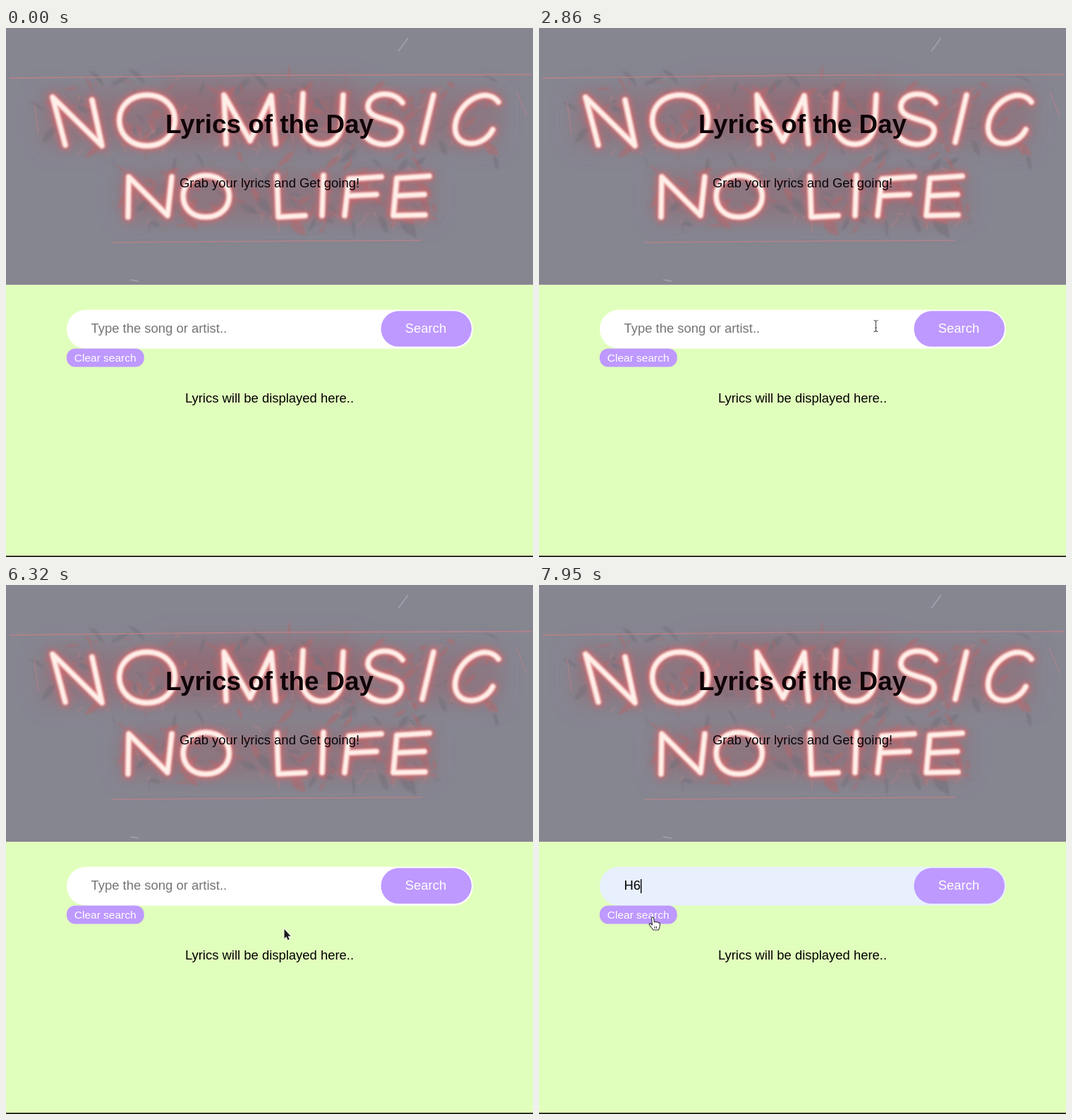
Recreate the animation shown at these times as an HTML page. Size 747 px wide and 750 px high, loop 8000 ms.

```html
<!DOCTYPE html>
<html lang="en">
<head>
<meta charset="utf-8">
<title>Lyrics of the Day</title>
<style>
html, body { margin: 0; width: 100%; height: 100%; overflow: hidden; background: #e1ffbc; }
svg { display: block; width: 747px; height: 750px; font: 18.45px "Liberation Sans", Arial, sans-serif; }
.tube { fill: none; stroke-linecap: round; stroke-linejoin: round; }
.mid { text-anchor: middle; }
</style>
</head>
<body>
<svg viewBox="0 0 747 750">
  <defs>
    <filter id="soft" x="-20%" y="-40%" width="140%" height="180%"><feGaussianBlur stdDeviation="16"/></filter>
    <filter id="glow" x="-10%" y="-10%" width="120%" height="120%"><feGaussianBlur stdDeviation="4"/></filter>
    <filter id="edge"><feGaussianBlur stdDeviation=".9"/></filter>
    <clipPath id="photo"><rect width="747" height="364"/></clipPath>
    <path id="sign" d="M84 166L66 98L136 167L122 102
      M200 95C254 96 251 167 200 167C149 167 146 96 200 95
      M312 164L309 95L346 160L376 96L382 164
      M421 93L419 134C420 175 475 175 476 134L478 95
      M562 106C548 86 513 92 513 112C514 134 564 126 560 148C556 169 524 170 510 154
      M606 95L590 162
      M698 105C681 82 642 104 637 136C632 171 676 172 690 144
      M173 268L174 211L229 266L235 211
      M283 209C328 210 327 268 283 268C241 268 240 210 283 209
      M384 210L386 268L424 266 M450 209L448 266
      M480 266L486 214L532 211M484 238L525 236
      M600 210L554 213L549 266L594 265M552 238L593 236"/>
  </defs>

  <g clip-path="url(#photo)">
    <rect width="747" height="364" fill="#868691"/>
    <g filter="url(#soft)" fill="#94626b">
      <rect x="50" y="90" width="650" height="78" opacity=".42"/>
      <rect x="220" y="75" width="280" height="85" opacity=".45"/>
      <rect x="165" y="206" width="440" height="66" opacity=".45"/>
    </g>
    <g filter="url(#edge)">
      <path id="shards" fill="#75707b" opacity=".6"/>
      <path id="leaves" fill="#b4666b" opacity=".5"/>
      <path id="glints" fill="none" stroke="#d08785" stroke-width="1.3" opacity=".55"/>
    </g>
    <g fill="none" stroke="#c48286" stroke-width="1.6">
      <path d="M5 71L380 67L745 66" opacity=".85"/>
      <path d="M150 304L590 301" opacity=".75"/>
      <path d="M40 105L46 150M724 90L738 125M386 270L387 290" opacity=".5"/>
      <path d="M556 33L570 14M176 357L188 359" stroke="#a2a2ad"/>
    </g>
    <use href="#sign" class="tube" stroke="#d3686d" stroke-width="15" opacity=".75" filter="url(#glow)"/>
    <use href="#sign" class="tube" stroke="#eba19f" stroke-width="10" opacity=".8" filter="url(#edge)"/>
    <use href="#sign" class="tube" stroke="#ffefe9" stroke-width="6.5" filter="url(#edge)"/>
  </g>

  <text class="mid" x="373.5" y="148.5" font-size="36.8" font-weight="bold" fill="#100308">Lyrics of the Day</text>
  <text class="mid" x="373.5" y="226.3" fill="#08040a">Grab your lyrics and Get going!</text>

  <rect id="field" x="86" y="399.5" width="576" height="55" rx="27.5"/>
  <text id="entry" x="120.5" y="432.3"></text>
  <rect id="caret" y="417" width="1.4" height="20"/>
  <g fill="#be99ff">
    <rect x="531.5" y="401.3" width="128.5" height="50.5" rx="25.2"/>
    <rect x="86" y="454.5" width="109.7" height="26" rx="12"/>
  </g>
  <g class="mid" fill="#fff">
    <text x="595" y="432.3">Search</text>
    <text x="140.7" y="473" font-size="15.5">Clear search</text>
  </g>
  <text class="mid" x="373.5" y="531">Lyrics will be displayed here..</text>
  <rect y="748.3" width="747" height="2" fill="#111"/>

  <g id="pointer" stroke-linejoin="round">
    <path id="arrow" d="M.5 1V14L3.5 11.4L5.6 16.3L7.6 15.4L5.6 10.7H9.4Z" fill="#1a1a1a" stroke="#eee" stroke-width="2" paint-order="stroke"/>
    <path id="beam" d="M-3-8Q0-8 0-6Q0-8 3-8M0-6V6M-3 8Q0 8 0 6Q0 8 3 8M-1.5 2.5H1.5" fill="none" stroke="#555" stroke-width="1.2"/>
    <path id="hand" d="M-1.5 1Q0-1 1.5 1L2.5 7Q4 5.5 5 7Q7 6 8 8Q10.5 7 10.5 10Q10.5 14 8.5 18H1L-4.5 11Q-5.5 8.5-3 9L-.5 11ZM3 13V16M5.5 13V16" fill="#fff" stroke="#333" stroke-width="1.1"/>
  </g>
</svg>
<script>
const $ = id => document.getElementById(id);

// Crumpled reddish reflections and dull scraps behind the tubes
let seed = 7;
const rnd = (lo, hi) => lo + (hi - lo) * ((seed = seed * 16807 % 2147483647) / 2147483647);
const scrap = (size, close) => {
  const upper = rnd(0, 1) < .62;
  const x = upper ? rnd(50, 700) : rnd(155, 610), y = upper ? rnd(74, 182) : rnd(198, 282);
  const dx = rnd(-size, size), dy = rnd(-size, size);
  const bend = `q${dx * .7 + 4} ${dy * .2 - 4} ${dx} ${dy}`;
  return `M${x} ${y}${bend}` + (close ? `q${-dx * .8} ${-dy * .1} ${-dx} ${-dy}z` : "");
};
const scraps = (count, size, close) => Array.from({ length: count }, () => scrap(size, close)).join("");
$("shards").setAttribute("d", scraps(110, 26, true));
$("leaves").setAttribute("d", scraps(190, 24, true));
$("glints").setAttribute("d", scraps(70, 14, false));

// [start ms, shape, x, y]
const pointerSteps = [
  [0, ""], [120, "arrow", 661, 443], [210, "arrow", 592, 215], [300, "arrow", 526, -18],
  [1010, "arrow", 527, 30], [1100, "arrow", 523, 130], [1190, "arrow", 526, 226],
  [1290, "arrow", 531, 275], [1380, "arrow", 536, 315], [1480, "arrow", 541, 350],
  [1570, "arrow", 546, 376], [1670, "arrow", 549, 391], [1770, "arrow", 552, 398],
  [1860, "hand", 561, 410], [2560, "hand", 557, 422], [2660, "beam", 519, 436],
  [2760, "beam", 492, 430], [2860, "beam", 477.5, 422.5], [5050, ""],
  [6030, "beam", 465, 430], [6130, "beam", 430, 443], [6230, "arrow", 405, 475],
  [6320, "arrow", 394, 487], [6410, "arrow", 307, 488], [6910, "arrow", 302, 488],
  [7000, "arrow", 292, 487], [7190, "arrow", 246, 487], [7280, "arrow", 272, 487],
  [7380, "arrow", 318, 487], [7470, "arrow", 335, 486], [7570, "arrow", 318, 484],
  [7660, "arrow", 275, 482], [7760, "arrow", 224, 479], [7850, "hand", 178, 474],
  [7950, "hand", 161, 471]
];
const caretOn = [[3750, 4250], [4750, 5240], [5730, 6230], [6710, 7470], [7950, 8000]];

function draw(now) {
  const t = now % 8000;
  const [, shape, x, y] = pointerSteps.findLast(step => step[0] <= t);
  for (const id of ["arrow", "beam", "hand"]) $(id).style.display = id === shape ? "" : "none";
  if (shape) $("pointer").setAttribute("transform", `translate(${x} ${y})`);

  const filled = t >= 6410;
  $("field").setAttribute("fill", filled ? "#e8f0fe" : "#fff");
  $("entry").textContent = filled ? "H6" : "Type the song or artist..";
  $("entry").setAttribute("fill", filled ? "#000" : "#757575");
  $("caret").setAttribute("x", t >= 6910 ? 144 : 120.7);
  $("caret").style.display = caretOn.some(([on, off]) => t >= on && t < off) ? "" : "none";
  requestAnimationFrame(() => draw(performance.now()));
}
draw(0);
</script>
</body>
</html>
```
